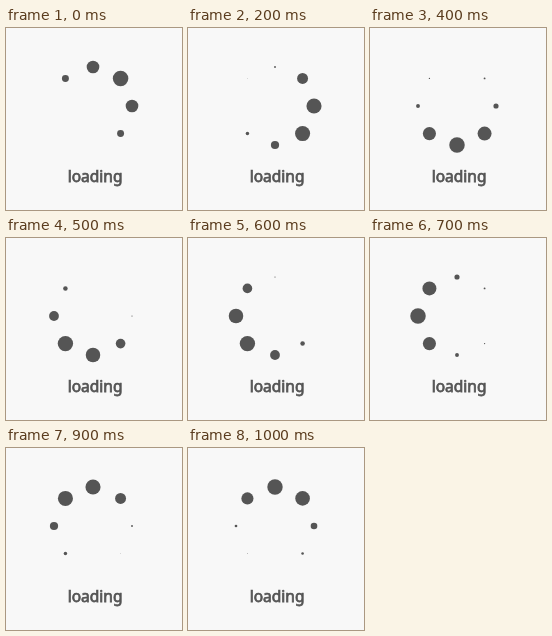
Recreate the animation shown at these times as an HTML page. Size 176x182 px, loop 1100 ms.

```html
<!DOCTYPE html>
<html lang="en">
<head>
<meta charset="utf-8">
<title>Loading</title>
<style>
  html, body { margin: 0; width: 100%; height: 100%; overflow: hidden; background: #f8f8f8; }
  svg { display: block; width: 176px; height: 182px; }
  circle { fill: #555; }
  text {
    font: 15.5px "Noto Sans", "Open Sans", sans-serif;
    fill: #555; stroke: #555; stroke-width: .75px;
    text-anchor: middle;
  }
</style>
</head>
<body>
<svg viewBox="0 0 176 182">
  <g id="ring"></g>
  <text x="89.1" y="154">loading</text>
</svg>
<script>
const LOOP = 1100, STEP = 100, COUNT = 8;
const CENTER = { x: 87, y: 78 }, RADIUS = 39;
const DOT = 15.5, SMALLEST = 0.5, FALLOFF = 2.6;

// Bell curve over the distance from the largest dot; diagonal dots fade later.
function diameter(distance, diagonal) {
  const spread = diagonal ? 2.18 : 1.84;
  const size = DOT * Math.exp(-((distance / spread) ** FALLOFF));
  return size < SMALLEST ? 0 : size;
}

const ring = document.getElementById("ring");
const dots = Array.from({ length: COUNT }, (_, i) => {
  const angle = (i / COUNT) * 2 * Math.PI;
  const dot = document.createElementNS("http://www.w3.org/2000/svg", "circle");
  dot.setAttribute("cx", CENTER.x + RADIUS * Math.sin(angle));
  dot.setAttribute("cy", CENTER.y - RADIUS * Math.cos(angle));
  return ring.appendChild(dot);
});

function draw(time) {
  const t = Math.floor((time % LOOP) / STEP) * STEP;
  const head = 1 + COUNT * t / LOOP;
  dots.forEach((dot, i) => {
    const gap = (head - i + COUNT) % COUNT;
    const distance = Math.min(gap, COUNT - gap);
    dot.setAttribute("r", diameter(distance, i % 2 === 1) / 2);
  });
}

const start = performance.now();
function tick() {
  draw(performance.now() - start);
  requestAnimationFrame(tick);
}
tick();
</script>
</body>
</html>
```
